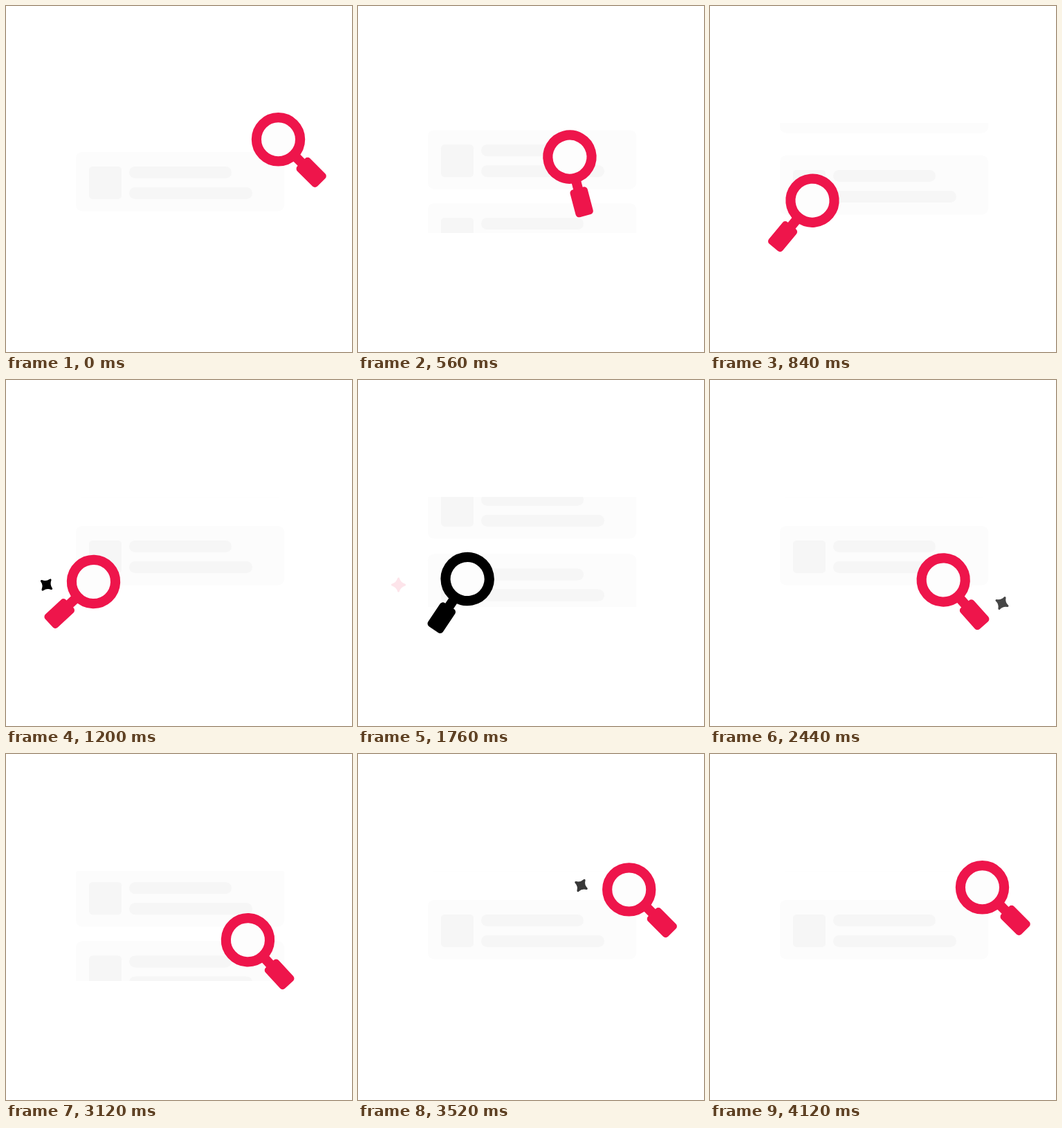
These frames come from a looping animation (500x500 px, 4200 ms). An HTML page:

```html
<!DOCTYPE html>
<html lang="en">
<head>
<meta charset="utf-8">
<title>Searching</title>
<style>
  html, body { margin: 0; width: 100%; height: 100%; overflow: hidden; background: #fff; }
  svg { display: block; width: 100%; height: 100%; }
</style>
</head>
<body>
<svg viewBox="0 0 500 500">
  <defs>
    <clipPath id="window"><rect x="90" y="169" width="322" height="159"/></clipPath>
    <g id="card">
      <rect x="101" y="211" width="301" height="85.5" rx="9" fill="#fcfcfc"/>
      <g fill="#f6f6f6">
        <rect x="120" y="232" width="47" height="47" rx="5"/>
        <rect x="178" y="232" width="148" height="17" rx="8.5"/>
        <rect x="178" y="262" width="178" height="17" rx="8.5"/>
      </g>
    </g>
  </defs>
  <g clip-path="url(#window)">
    <use id="leaving" href="#card"/>
    <use id="arriving" href="#card"/>
  </g>
  <path id="star" d="M0-9Q2-2 9 0Q2 2 0 9Q-2 2-9 0Q-2-2 0-9Z" stroke-width="3" stroke-linejoin="round"/>
  <g id="glass">
    <rect x="36" y="-7" width="15" height="14"/>
    <rect x="46.9" y="-13" width="41" height="26" rx="5"/>
    <circle r="31.6" fill="#fdfdfd" stroke-width="14.2"/>
  </g>
</svg>
<script>
const LOOP = 4200, STEP = 40;
const RED = '#ee154b';
const [leaving, arriving, star, glass] =
  ['leaving', 'arriving', 'star', 'glass'].map(id => document.getElementById(id));

// Resting poses of the magnifier; angle is the direction of its handle.
const right = { x: 393.5, y: 192.8, angle: 45 };
const left = { x: 126.5, y: 291.5, angle: 137 };
const low = { x: 337.7, y: 289, angle: 48 };

const moves = [
  { start: 20, end: 1220, from: right, to: left, lift: 8 },
  { start: 1257, end: 2617, from: left, to: low, lift: 7 },
  { start: 2654, end: 3811, from: low, to: right, lift: 0 }
];
const stars = [
  { start: 1120, x: 58.5, y: 296 },
  { start: 2240, x: 422, y: 322.5 },
  { start: 3360, x: 322.5, y: 190 }
];
const STAR_LIFE = 720;
const scrolls = [364, 1448, 2873];
const SCROLL_TIME = 600, LEAD = 50;

const clamp = v => Math.min(1, Math.max(0, v));
const lerp = (a, b, p) => a + (b - a) * p;
const smooth = s => s * s * (3 - 2 * s);
const quart = s => s < 0.5 ? 8 * s ** 4 : 1 - 8 * (1 - s) ** 4;

function drawGlass(t) {
  const { start, end, from, to, lift } = moves.findLast(m => t >= m.start) || moves[0];
  const p = quart(clamp((t - start) / (end - start)));
  const x = lerp(from.x, to.x, p);
  const y = lerp(from.y, to.y, p) - 4 * lift * p * (1 - p);
  glass.setAttribute('transform', `translate(${x} ${y}) rotate(${lerp(from.angle, to.angle, p)})`);
  const color = t >= 1720 && t < 1840 ? '#000' : RED;
  glass.setAttribute('fill', color);
  glass.setAttribute('stroke', color);
  glass.setAttribute('stroke-width', 0);
}

function drawStar(t) {
  const current = stars.find(s => t >= s.start && t < s.start + STAR_LIFE);
  star.setAttribute('visibility', current ? 'visible' : 'hidden');
  if (!current) return;
  const age = t - current.start;
  const turn = 45 * (1 - clamp(age / 500));
  const color = age < 400 ? '#000' : RED;
  star.setAttribute('transform', `translate(${current.x} ${current.y}) rotate(${turn})`);
  star.setAttribute('fill', color);
  star.setAttribute('stroke', color);
  star.setAttribute('opacity', age < 100 ? 1 : 1 - age / STAR_LIFE);
}

function drawList(t) {
  const start = scrolls.findLast(s => t >= s - LEAD) ?? scrolls[0];
  const progress = from => smooth(clamp((t - from) / SCROLL_TIME));
  leaving.setAttribute('y', -127 * progress(start));
  arriving.setAttribute('y', 117 * (1 - progress(start - LEAD)));
}

function draw(t) {
  drawList(t);
  drawStar(t);
  drawGlass(t);
}

const origin = performance.now();
function tick() {
  const elapsed = (performance.now() - origin) % LOOP;
  draw(Math.floor(elapsed / STEP) * STEP);
  requestAnimationFrame(tick);
}
tick();
</script>
</body>
</html>
```
